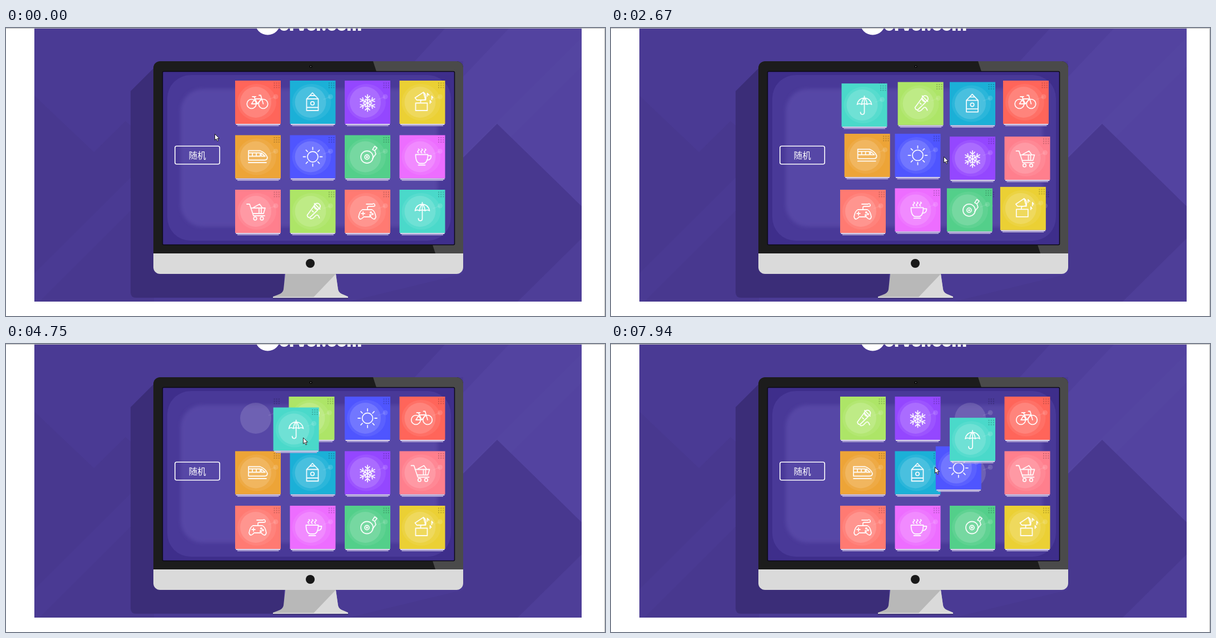
An HTML page for the animation above (8 s loop, 1077x520 px).

```html
<!DOCTYPE html>
<html lang="zh">
<head>
<meta charset="utf-8">
<title>Shuffle board</title>
<style>
  html, body { margin: 0; width: 100%; height: 100%; overflow: hidden; background: #fff; }
  svg { display: block; width: 1077px; height: 520px; }
  .icon { fill: none; stroke: #fff; stroke-opacity: .92; stroke-width: 1.8; stroke-linecap: round; stroke-linejoin: round; }
  .label { font: 15.5px "Noto Sans CJK SC", "Noto Sans CJK", sans-serif; text-anchor: middle; fill: #fff; }
  .brand { font: 900 29px Inter, "Open Sans", sans-serif; fill: #fff; }
  #button rect { fill: transparent; stroke: #fff; stroke-width: 1.6; }
  #button.hover rect { fill: #fff; }
  #button.hover .label { fill: #4b3b96; }
</style>
</head>
<body>
<svg viewBox="0 0 1077 520">
  <defs>
    <clipPath id="page"><rect x="51" y="1" width="984" height="493"/></clipPath>
    <clipPath id="case"><rect x="265" y="60" width="557" height="384" rx="12"/></clipPath>
    <filter id="soft"><feGaussianBlur stdDeviation="3"/></filter>
    <g id="mark">
      <path d="M60 34L73 29" stroke="#fff" stroke-opacity=".08" stroke-width="2"/>
      <circle cx="37" cy="39" r="28" fill="#fff" fill-opacity=".14"/>
      <circle cx="73" cy="29" r="4.5" fill="#fff" fill-opacity=".14"/>
      <path d="M69.5 4.5h11M69.5 8.5h11M69.5 12.5h11" stroke="#000" stroke-opacity=".2" stroke-width="2" stroke-dasharray="2 2.2"/>
    </g>
  </defs>

  <rect width="1077" height="520" fill="#fff"/>
  <g clip-path="url(#page)">
    <rect x="51" width="984" height="494" fill="#4a3a94"/>
    <path d="M790 0H1035V322L883 173L822 234V60H735Z" fill="#4f3f9b"/>
    <path d="M905 0H1035V322L883 173L822 234V88Z" fill="#5343a0"/>
    <path d="M1035 0V70L822 283V230L1035 17Z" fill="#5646a2" fill-opacity=".6"/>
    <path d="M883 173L1035 322V494H616L822 444V234Z" fill="#48388f"/>
    <path d="M1035 380V494H920Z" fill="#4e3e98"/>
    <path d="M51 122L158 224L215 168L266 216V494H51Z" fill="#48388f"/>
    <path d="M224 270V330L60 494H51V443Z" fill="#4c3c96" fill-opacity=".6"/>
    <path d="M266 72L224 114V477Q224 487 234 487H500V430H266Z" fill="#3b2d78"/>
    <circle cx="470.500" cy="-10" r="22.500" fill="#fff"/>
    <text class="brand" x="491" y="5">orvel.com</text>
  </g>
  <path d="M0 .5H1076.500V520" fill="none" stroke="#b8b8b8"/>

  <path d="M502 444H593L597 472Q598 479 608 482L615 485V487H480V485L488 482Q498 479 499 472Z" fill="#b8b8b8"/>
  <path d="M593 444L597 472Q598 479 608 482L615 485V487H552Z" fill="#dadada"/>
  <path d="M480 486.500H615" stroke="#e6e6e6" stroke-width="1.500"/>
  <path d="M480 488H615" stroke="#2c2358"/>
  <g clip-path="url(#case)">
    <rect x="265" y="60" width="557" height="347" fill="#1c1c1c"/>
    <path d="M660 60H822V407H772Z" fill="#4a4a4a"/>
    <rect x="265" y="407" width="557" height="37" fill="#dadada"/>
  </g>
  <circle cx="548" cy="69.500" r="2.500" fill="#050505"/>
  <circle cx="548" cy="69.500" r="1" fill="#777"/>
  <circle cx="547" cy="425" r="8" fill="#181818"/>
  <rect x="281.500" y="78.500" width="525" height="313" rx="2" fill="#3e2e8b" stroke="#0c0a18" stroke-width="1.500"/>
  <rect x="290" y="85" width="510" height="299" rx="42" fill="#493998"/>
  <rect x="314" y="110" width="462" height="249" rx="40" fill="#5646a6" filter="url(#soft)"/>

  <g id="button">
    <rect x="303.800" y="213.300" width="80.400" height="32.400" rx="3"/>
    <text class="label" x="344" y="235.500">随机</text>
  </g>
  <g id="slots"></g>
  <g id="tiles"></g>
  <path id="arrow" d="M.5 .5V11.500L3 9L5 13.300L6.800 12.500L5 8.400H8.500Z" fill="#fff" stroke="#111" stroke-width=".9"/>
  <path id="beam" d="M-3 -5.500H-1L0 -4.500L1 -5.500H3M0 -4.500V5.500M-2 6H2" fill="none" stroke="#333"/>
</svg>
<script>
const LOOP = 8000, MOVE = 500;
const $ = id => document.getElementById(id);
const slotAt = i => [412 + 98.5 * (i % 4), 95 + 98.5 * Math.floor(i / 4)];
const circle = (x, y, r) => `<circle cx="${x}" cy="${y}" r="${r}"/>`;
const line = d => `<path d="${d}"/>`;
const spokes = (n, x, y, d) => Array.from({ length: n }, (_, i) =>
  `<path transform="translate(${x} ${y}) rotate(${i * 360 / n})" d="${d}"/>`).join("");

// name: [tile colour, icon]; painted in this order
const kinds = {
  pencil: ["#1bb0d7", line("M30 33L40.500 22L51 33V54H30ZM30 33H51M30 48.500H51M36 27H45") + circle(40.5, 41, 3.2)],
  sun: ["#4f55ff", circle(41, 39, 9.5) + spokes(8, 41, 39, "M0 -13V-17")],
  bike: ["#ff655a", circle(29.5, 42, 8.3) + circle(50.5, 42, 8.3) +
    line("M29.500 42L35.500 33H47.500L40 42ZM40 42L34 29M31 29H37M43 26.500H46L50.500 42")],
  snow: ["#9447ff", spokes(6, 41, 40.5, "M0 0V-15M-4 -12.500L0 -8.500L4 -12.500M-3 -7L0 -4L3 -7")],
  gram: ["#ebd034", line("M29 40.500H50V54H29ZM38 40V36L46 34M28 31L43 21L47 35L31 35ZM43 21Q49 25 47 35M50 28V23L53 26M58 34V28L60 31M55 41V36L57 39")],
  train: ["#eda437", line("M24 28H45Q55 32 58 40Q58 45 53 45H24ZM24 32H45V38H24M31 32V38M38 32V38M47 32L54 38H47ZM24 49.500H56")],
  turn: ["#53cf8a", circle(40, 39.5, 11) + circle(40, 39.5, 4) + circle(40, 39.5, 1) +
    line("M50 26L54 20L58 23L54 28ZM54 28L56 34L50 42")],
  cup: ["#ed6dff", line("M29 35H51Q51 50 43 51H37Q29 50 29 35M51 37H57Q57 45 49 45M34 54H46M34 32Q31 30 34 28T34 25M40 32Q37 30 40 28T40 25M46 32Q43 30 46 28T46 25")],
  cart: ["#ff7f8d", line("M21 26H26L33 47H53M28 33H54L51 43H32M33 32L44 26L49 33M43 33V43M47 33V43") + circle(36, 52, 2.8) + circle(48, 52, 2.8)],
  mic: ["#ade567", circle(49, 30, 5.5) + line("M43.500 29L50 36.500L36 50Q32 51 31 46ZM44 25L54 35M40 38L42 40M36 52Q40 54 45 48T53 51")],
  game: ["#ff7a72", line("M32 36H49Q54 38 56 49Q54 57 47 49H34Q27 57 25 49Q27 38 32 36M41 36V32Q41 30 44 30H52Q55 30 54 27T50 26H39M30 43H36M33 40V46") +
    circle(47, 41, 1.2) + circle(50, 44, 1.2) + circle(46, 46, 1.2)],
  umb: ["#4ad9ca", line("M28 38Q30 27 41 26Q52 27 54 38Q50 35 46 38Q41 35 36 38Q32 35 28 38M36 38Q37 29 41 26Q45 29 46 38M41 23V52Q41 56 37.500 56Q34 56 34 52")]
};

const orders = [
  "bike pencil snow gram train sun turn cup cart mic game umb",
  "gram sun bike train turn cup pencil mic game umb snow cart",
  "umb mic pencil bike train sun snow cart game cup turn gram"
].map(s => s.split(" "));

// cursor path: time, x, y
const path = [
  [0, 375, 191], [119, 375, 191], [120, 372, 191], [640, 372, 191], [1310, 341, 223],
  [2520, 341, 223], [2670, 598, 232], [3050, 633, 145], [3660, 548, 222], [3796, 548, 222],
  [4057, 519, 197], [4340, 462, 150], [4700, 530, 170], [5380, 584, 153], [5447, 583, 155],
  [5880, 627.5, 208], [6005, 627.5, 208], [6430, 648, 213], [6600, 649, 148],
  [6970, 605, 208], [7400, 600, 212], [7660, 584, 224], [7940, 582, 222], [8000, 582, 222]
];

// screen refreshes: first, last, count
const refresh = [
  [0, 0, 1], [120, 120, 1], [770, 1310, 5], [1590, 2510, 7], [2670, 3660, 8],
  [3780, 4750, 8], [4870, 5880, 8], [6160, 6970, 7], [7400, 7940, 5]
];

const mix = (a, b, k) => a.map((v, i) => v + (b[i] - v) * k);
const ease = k => k < .5 ? 2 * k * k : 1 - 2 * (1 - k) ** 2;

function cursor(t) {
  const i = Math.max(1, path.findIndex(p => p[0] >= t));
  const [a, b] = [path[i - 1], path[i]];
  return mix(a.slice(1), b.slice(1), (t - a[0]) / (b[0] - a[0]));
}

function hold(t) {
  const [from, to, n] = refresh.filter(r => r[0] <= t).pop();
  if (n === 1) return from;
  const gap = (to - from) / (n - 1);
  return from + gap * Math.min(n - 1, Math.floor((t - from) / gap + .01));
}

const tiles = {}, rest = {};
orders[0].forEach((name, i) => {
  rest[name] = slotAt(i);
  tiles[name] = [{ at: 0, pos: () => slotAt(i) }];
});

function glide(name, at, to, from = rest[name]) {
  tiles[name].push({ at, pos: t => mix(from, to, ease(Math.min(1, (t - at) / MOVE))) });
  rest[name] = to;
}

function shuffle(at, order) {
  order.forEach((name, i) => glide(name, at, slotAt(i)));
}

function drag(name, other, grab, drop) {
  const home = rest[name], start = cursor(grab);
  const pos = t => cursor(t).map((v, i) => v - start[i] + home[i]);
  tiles[name].push({ at: grab, pos });
  glide(name, drop, rest[other], pos(drop));
  glide(other, drop, home);
}

shuffle(1508, orders[1]);
shuffle(2227, orders[2]);
drag("pencil", "sun", 3050, 3796);
drag("umb", "mic", 4340, 4700);
drag("umb", "snow", 5380, 6005);
drag("sun", "umb", 6600, 7660);

$("slots").innerHTML = orders[0].map((_, i) =>
  `<use href="#mark" transform="translate(${slotAt(i)})"/>`).join("");
$("tiles").innerHTML = Object.entries(kinds).map(([name, [color, icon]]) => `<g id="${name}">
  <rect width="82" height="78" fill="${color}"/>
  <ellipse cx="39" cy="39" rx="35" ry="33" fill="#fff" fill-opacity=".07"/>
  <use href="#mark"/>
  <rect x="1.5" y="78" width="79.5" height="2" fill="#ddd6ee"/>
  <rect x="4" y="80.500" width="74.500" height="1.700" fill="#b8aedb"/>
  <g class="icon">${icon}</g></g>`).join("");

const place = (el, p) => el.setAttribute("transform", `translate(${p[0].toFixed(2)} ${p[1].toFixed(2)})`);

function draw(now) {
  const t = hold(now % LOOP);
  for (const name in tiles) {
    place($(name), tiles[name].filter(e => e.at <= t).pop().pos(t));
  }
  const p = cursor(t), over = p[0] > 303 && p[0] < 385 && p[1] > 213 && p[1] < 246;
  const onText = over && p[1] > 220;
  $("button").classList.toggle("hover", over);
  $("arrow").style.display = onText ? "none" : "";
  $("beam").style.display = onText ? "" : "none";
  place($("arrow"), p);
  place($("beam"), p);
}

const began = performance.now();
function tick() {
  draw(performance.now() - began);
  requestAnimationFrame(tick);
}
tick();
</script>
</body>
</html>
```
